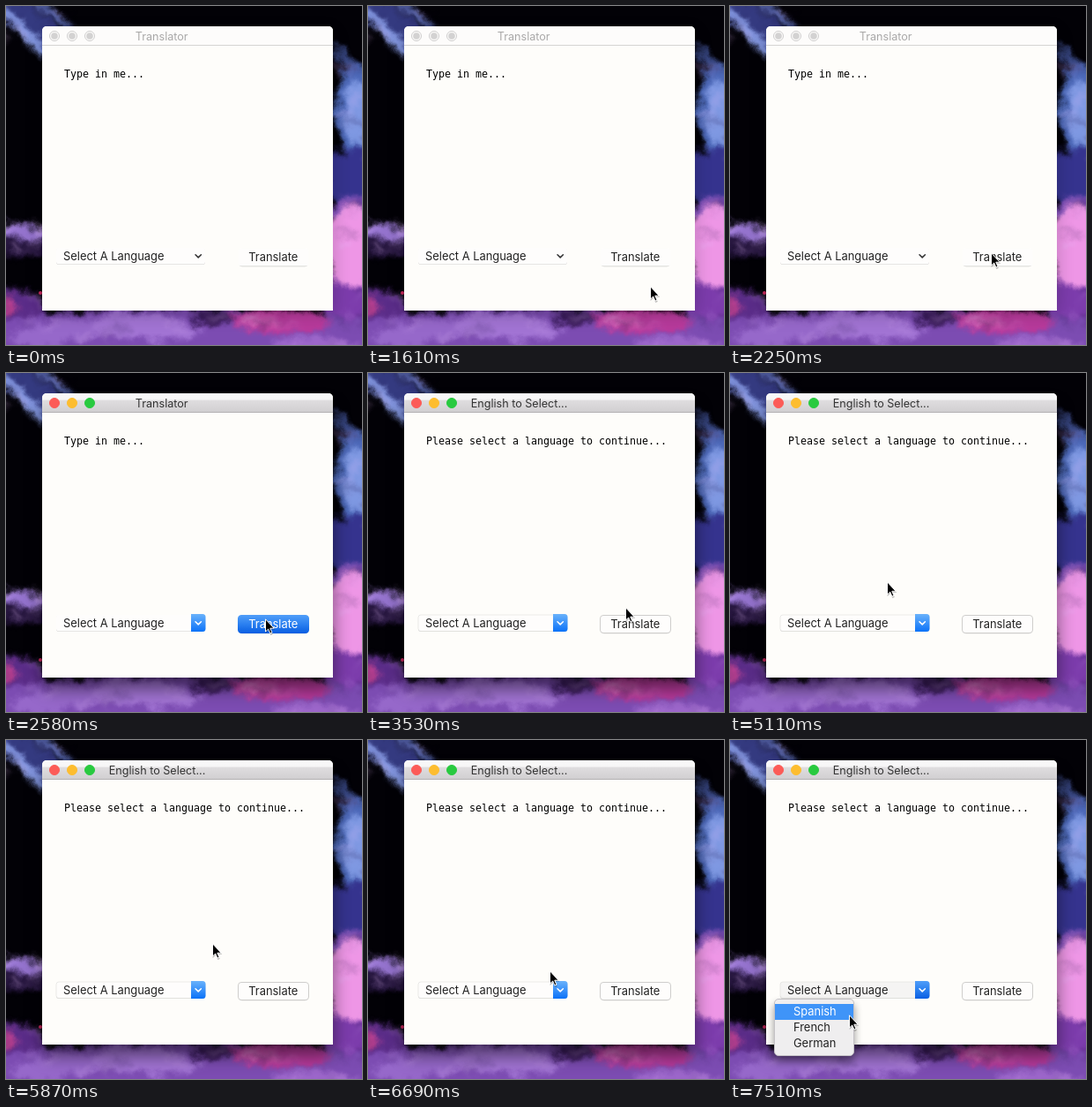
An HTML page for the animation above (7990 ms loop, 404 by 384 pixels).

```html
<!DOCTYPE html>
<html lang="en">
<head>
<meta charset="utf-8">
<title>Translator</title>
<style>
  html, body { margin: 0; width: 100%; height: 100%; overflow: hidden; background: #000; }
  svg { display: block; width: 404px; height: 384px; }
  text { font: 12.9px Inter, "Open Sans", sans-serif; fill: #222; }
  .mono { font: 11.63px "DejaVu Sans Mono", monospace; fill: #000; }
  .title { font-size: 12.6px; text-anchor: middle; }
  .mid { text-anchor: middle; }
</style>
</head>
<body>
<svg viewBox="0 0 404 384">
  <defs>
    <filter id="powder" x="-60" y="-60" width="524" height="504" filterUnits="userSpaceOnUse" color-interpolation-filters="sRGB">
      <feGaussianBlur in="SourceGraphic" stdDeviation="3" result="soft"/>
      <feTurbulence type="fractalNoise" baseFrequency=".05" numOctaves="4" seed="8"/>
      <feDisplacementMap in="soft" scale="20" xChannelSelector="R" yChannelSelector="G"/>
    </filter>
    <filter id="blur" x="-20%" y="-20%" width="140%" height="140%"><feGaussianBlur stdDeviation="10"/></filter>
    <filter id="blurSmall" x="-30%" y="-30%" width="160%" height="160%"><feGaussianBlur stdDeviation="5"/></filter>
    <linearGradient id="bar" x2="0" y2="1">
      <stop stop-color="#fafafa"/><stop offset=".33" stop-color="#f6f5f6"/>
      <stop offset=".36" stop-color="#dfdddf"/><stop offset="1" stop-color="#d0ced0"/>
    </linearGradient>
    <linearGradient id="blue" x2="0" y2="1">
      <stop stop-color="#6ab2fb"/><stop offset="1" stop-color="#0b72f8"/>
    </linearGradient>
    <linearGradient id="deepBlue" x2="0" y2="1">
      <stop stop-color="#4f9df8"/><stop offset=".5" stop-color="#2b80f0"/><stop offset="1" stop-color="#0a5fe2"/>
    </linearGradient>
  </defs>

  <rect width="404" height="384" fill="#020106"/>
  <g id="sky" filter="url(#powder)"></g>
  <circle cx="39" cy="325" r="2" fill="#c8285c"/>

  <rect id="shadow" x="41" y="30" width="330" height="320" rx="6" filter="url(#blur)"/>
  <path d="M41 345V28a5 5 0 0 1 5-5H366a5 5 0 0 1 5 5V345Z" fill="#fefdfa"/>
  <path id="titleBar" d="M41 45V28a5 5 0 0 1 5-5H366a5 5 0 0 1 5 5V45Z"/>
  <path id="titleLine" d="M41 44.5H371"/>
  <g id="lights"></g>
  <text id="title" class="title" y="39"></text>
  <text id="message" class="mono" x="66" y="81"></text>

  <rect x="57" y="275" width="169" height="18" rx="3" fill="#000" opacity=".18"/>
  <rect id="combo" x="57" y="274" width="169" height="18.5" rx="3"/>
  <path id="comboButton" d="M210 273H223a3.5 3.5 0 0 1 3.5 3.5V289.5a3.5 3.5 0 0 1-3.5 3.5H210Z"/>
  <path id="chevron" d="M215 281.7l3.2 3.2 3.2-3.2" fill="none" stroke-width="1.5" stroke-linecap="round" stroke-linejoin="round"/>
  <text x="65" y="288">Select A Language</text>

  <rect x="264.5" y="277" width="78" height="18.2" rx="3.5" fill="#000" opacity=".2"/>
  <rect id="button" x="263.5" y="274.5" width="80" height="20" rx="3.5"/>
  <text id="buttonText" class="mid" x="303.3" y="289">Translate</text>

  <g id="popup">
    <rect x="50" y="299" width="91" height="64" rx="5" opacity=".4" filter="url(#blurSmall)"/>
    <rect x="50.5" y="293.5" width="90" height="64" rx="4.5" fill="#efeeef" stroke="#c4c2c6"/>
    <rect id="highlight" x="51" y="299" width="89" height="18" fill="#3f94f8"/>
    <text id="firstItem" x="72" y="312">Spanish</text>
    <text x="72" y="330">French</text>
    <text x="72" y="348">German</text>
  </g>

  <g id="cursor">
    <path d="M0 1V16L3.4 12.8L5.7 18L8.2 17L6 11.8H10.7Z" fill="#000" opacity=".25" transform="translate(.6 1)"/>
    <path d="M.5 .8V15L3.7 12L5.9 17.1L8 16.2L5.8 11.2H10.2Z" stroke="#fff" stroke-width="1"/>
  </g>
</svg>

<script>
const LOOP = 7990, TICK = 58.5;
const ACTIVATE = 2550, PRESS = 2580, RELEASE = 2870, OPEN = 6920, HOVER = 7450;
const $ = id => document.getElementById(id);

function set(el, attrs) {
  for (const name in attrs) el.setAttribute(name, attrs[name]);
}
function add(parent, tag, attrs) {
  const el = document.createElementNS("http://www.w3.org/2000/svg", tag);
  set(el, attrs);
  parent.append(el);
  return el;
}

// Wallpaper: clouds of coloured powder as [x, y, rx, ry, angle, colour].
const clouds = [
  [25, 18, 70, 17, 36, "#343a80"], [22, 30, 50, 7, 46, "#8296e0"], [50, 8, 36, 4, 35, "#5c6cba"],
  [394, 72, 34, 6, 52, "#3c4c8c"], [404, 122, 32, 52, -8, "#4c68b8"], [402, 122, 20, 36, -10, "#7e98e2"],
  [396, 195, 36, 36, 0, "#35338e"], [392, 228, 30, 12, -12, "#8050b8"],
  [398, 335, 40, 40, 0, "#7c3cac"], [394, 272, 34, 46, 0, "#ee96e6"],
  [12, 272, 44, 14, 8, "#22123a"], [10, 255, 46, 9, 8, "#9a78d4"],
  [8, 345, 40, 24, 12, "#5a2c88"], [200, 378, 260, 36, 0, "#7c4cb2"],
  [2, 338, 12, 10, 0, "#d0489c"], [60, 370, 55, 14, -8, "#9668ca"],
  [160, 364, 60, 14, 4, "#a274d4"], [236, 354, 22, 10, 0, "#3c1c5c"],
  [310, 357, 56, 14, 3, "#b83a9c"], [290, 357, 26, 6, 5, "#d457b0"],
  [350, 384, 50, 9, 0, "#9c66ca"]
];
const cloud = ([cx, cy, rx, ry, angle, fill], opacity = 1) =>
  add($("sky"), "ellipse", { cx, cy, rx, ry, fill, opacity, transform: `rotate(${angle} ${cx} ${cy})` });
clouds.forEach(c => cloud(c));

let seed = 11;
const random = () => (seed = seed * 16807 % 2147483647) / 2147483647;
for (let i = 0; i < 120; i++) {
  const [x, y, rx, ry, angle] = clouds[Math.floor(random() * clouds.length)];
  const spotX = x + (random() - .5) * rx * 1.5, spotY = y + (random() - .5) * ry * 1.5;
  cloud([spotX, spotY, 3 + random() * 9, 1 + random() * 3, angle, random() < .5 ? "#241048" : "#e8c0ff"], .22);
}

const lights = ["#fc5b57", "#fdbd2f", "#28ca3f"].map((color, i) => {
  const at = { cx: 55 + i * 20, cy: 34 };
  const ring = add($("lights"), "circle", { ...at, r: 5.5 });
  const dot = add($("lights"), "circle", { ...at, r: 3.8, fill: "#d3d2d2" });
  return { color, ring, dot };
});

// Pointer path as [time, x, y]; it rests between equal points.
const path = [
  [350, 370, 375], [410, 370, 373], [640, 370, 373], [710, 361, 370],
  [1192, 361, 370], [1610, 320, 316], [2020, 310, 289],
  [2022, 310, 289], [2310, 294, 278], [3172, 294, 278], [3350, 292, 272],
  [3472, 292, 272], [3530, 292, 266], [3880, 221, 73],
  [4422, 221, 73], [4990, 174, 222], [5110, 178, 236], [5230, 194, 238],
  [5340, 204, 241], [5462, 204, 241], [5700, 237, 227],
  [5812, 237, 227], [6160, 205, 263], [6282, 205, 263], [6500, 255, 161],
  [6690, 206, 261], [6860, 191, 280], [7162, 191, 280], [7510, 135, 311]
];

// Monotone cubic: smooth through the points, still at turns and rests.
function slope(i, axis) {
  if (i < 1 || i >= path.length - 1) return 0;
  const rate = j => (path[j + 1][axis] - path[j][axis]) / (path[j + 1][0] - path[j][0]);
  const before = rate(i - 1), after = rate(i);
  return before * after > 0 ? 2 * before * after / (before + after) : 0;
}
function pointerAt(t) {
  const i = path.findIndex(p => p[0] > t);
  if (i < 0) return path.at(-1).slice(1);
  const a = path[Math.max(i - 1, 0)], b = path[i], span = b[0] - a[0];
  const k = span ? (t - a[0]) / span : 0;
  return [1, 2].map(axis => Math.round(
    a[axis] + (b[axis] - a[axis]) * k * k * (3 - 2 * k)
    + span * k * (1 - k) * ((1 - k) * slope(i - 1, axis) - k * slope(i, axis))));
}

const show = (id, visible) => set($(id), { visibility: visible ? "visible" : "hidden" });

function render(t) {
  const active = t >= ACTIVATE, pressed = t >= PRESS && t < RELEASE;
  const asked = t >= RELEASE, open = t >= OPEN, hover = t >= HOVER;

  set($("shadow"), { opacity: active ? .5 : .2, y: active ? 38 : 30 });
  set($("titleBar"), { fill: active ? "url(#bar)" : "#fdfcfb" });
  set($("titleLine"), { stroke: active ? "#b3b1b3" : "#d5d4d3" });
  set($("title"), { x: asked ? 171.5 : 176.7, style: `fill:${active ? "#333" : "#a9a8a8"}` });
  $("title").textContent = asked ? "English to Select..." : "Translator";
  $("message").textContent = asked ? "Please select a language to continue..." : "Type in me...";
  for (const { color, ring, dot } of lights) {
    set(ring, { fill: active ? color : "#fdfcfb", stroke: active ? color : "#cfcece" });
    set(dot, { visibility: active ? "hidden" : "visible" });
  }

  set($("combo"), { fill: open ? "#f5f4f3" : "#fefdfc", stroke: asked ? "#deddda" : "none", "stroke-width": .6 });
  set($("comboButton"), { fill: open ? "url(#deepBlue)" : active ? "url(#blue)" : "none" });
  set($("chevron"), { stroke: active ? "#fff" : "#333" });
  set($("button"), {
    fill: pressed ? "url(#deepBlue)" : "#fefdfc",
    stroke: pressed ? "url(#deepBlue)" : asked ? "#cfcecc" : "none"
  });
  set($("buttonText"), { style: `fill:${pressed ? "#fff" : "#222"}` });

  show("popup", open);
  show("highlight", hover);
  set($("firstItem"), { style: `fill:${hover ? "#fff" : "#222"}` });

  // The pointer is redrawn once per tick, as in a screen recording.
  show("cursor", t >= 360);
  const sampled = (Math.floor(t / TICK - .25) + .4) * TICK;
  set($("cursor"), { transform: `translate(${pointerAt(sampled)})` });
}

function frame() {
  render(performance.now() % LOOP);
  requestAnimationFrame(frame);
}
frame();
</script>
</body>
</html>
```
